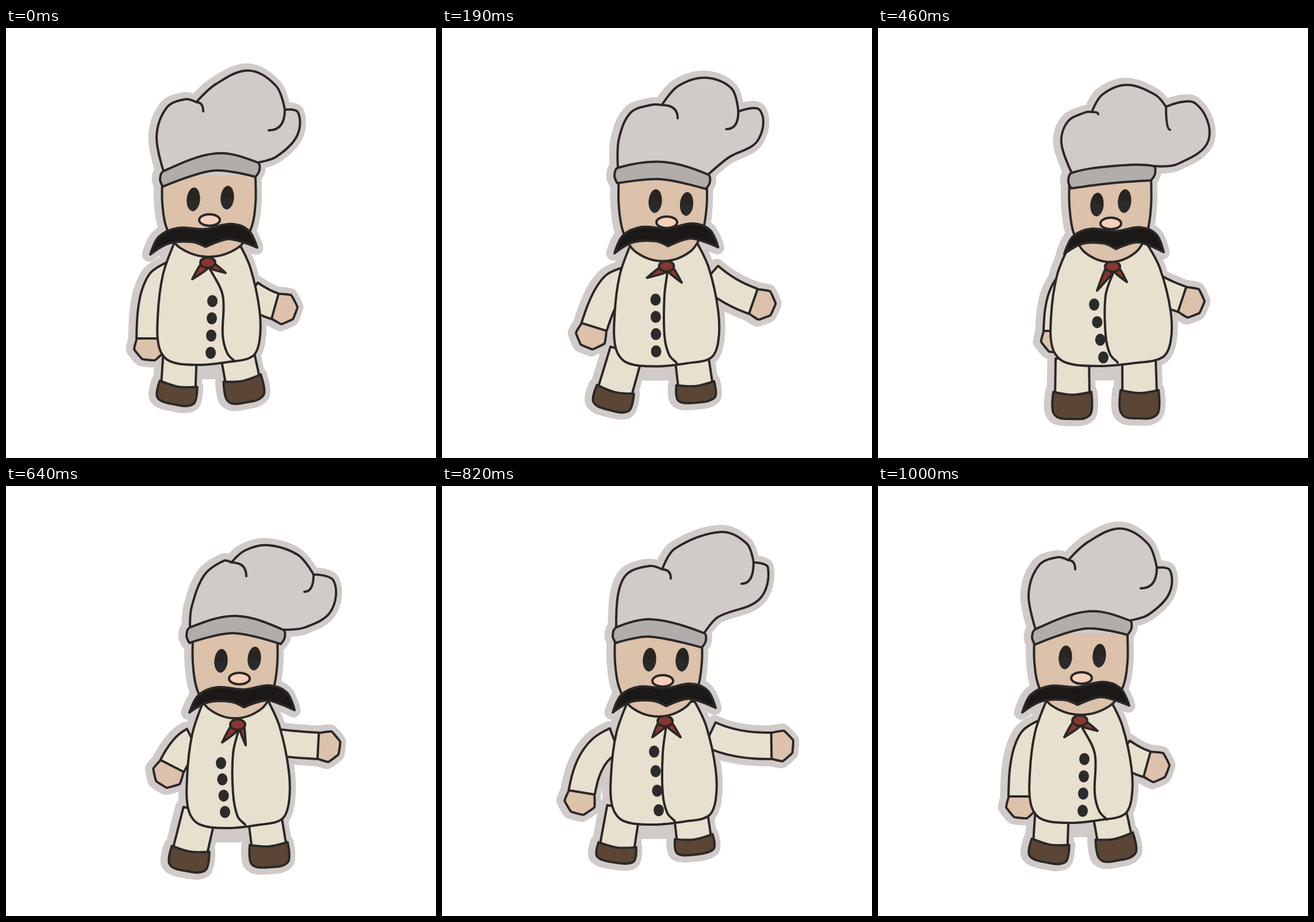
An HTML page with a canvas that plays this animation: 748 px wide and 748 px high, repeating every 1130 ms.

```html
<!DOCTYPE html>
<html lang="en">
<head>
<meta charset="utf-8">
<title>Dancing chef</title>
<style>
html, body { margin: 0; width: 100%; height: 100%; overflow: hidden; background: #fff; }
canvas { display: block; }
</style>
</head>
<body>
<canvas id="stage" width="748" height="748"></canvas>
<script>
const ctx = document.getElementById('stage').getContext('2d');
const INK = '#2a2827', CREAM = '#e7e0cf', SKIN = '#dcc1ab', SHOE = '#5b4636', RED = '#8a3731', HAT = '#d0cbc8';

// Joints of a pose. Arms: shoulder, elbow, wrist. Legs: hip, ankle, toe.
// Face: left, right, chin. Body: left, right, hem, seam. Scarf: knot and two tips.
const rest = {
  band: [[274, 249], [366, 218], [438, 234]],
  puffL: [[262, 188], [280, 138], [312, 124]], notchL: [331, 129], foldL: [343, 145],
  puffM: [[366, 97], [422, 74], [470, 101]], notchR: [485, 142], foldR: [457, 178],
  puffR: [[508, 147], [506, 188], [470, 224]],
  face: [272, 434, 398], eyes: [[326, 298], [385, 295]], nose: [354, 334], tache: [[251, 394], [437, 382]],
  body: [264, 441, 586, 377], scarf: [[351, 408], [324, 437], [382, 426]], buttons: [[359, 475], [356, 565]],
  armL: [[285, 430], [250, 438], [250, 540]], armR: [[425, 462], [450, 479], [468, 484]],
  legL: [[303, 560], [300, 620], [294, 655]], legR: [[400, 555], [411, 610], [419, 651]]
};
const stepOut = {
  band: [[295, 246], [375, 233], [446, 248]],
  puffL: [[296, 180], [311, 139], [345, 129]], notchL: [362, 131], foldL: [376, 161],
  puffM: [[390, 93], [440, 76], [490, 95]], notchR: [503, 151], foldR: [477, 177],
  puffR: [[541, 153], [522, 197], [478, 214]],
  face: [299, 449, 402], eyes: [[352, 302], [408, 306]], nose: [375, 339], tache: [[283, 393], [458, 375]],
  body: [286, 465, 591, 383], scarf: [[383, 409], [346, 425], [409, 441]], buttons: [[367, 467], [364, 559]],
  armL: [[300, 441], [276, 440], [261, 541]], armR: [[445, 425], [482, 475], [524, 495]],
  legL: [[317, 565], [302, 629], [296, 663]], legR: [[416, 565], [422, 611], [424, 639]]
};
const swing = {
  band: [[317, 240], [395, 233], [480, 262]],
  puffL: [[319, 208], [345, 156], [385, 138]], notchL: [403, 137], foldL: [444, 153],
  puffM: [[430, 110], [476, 97], [517, 115]], notchR: [528, 140], foldR: [512, 175],
  puffR: [[566, 134], [576, 195], [520, 236]],
  face: [316, 472, 409], eyes: [[390, 300], [443, 306]], nose: [407, 337], tache: [[317, 391], [503, 388]],
  body: [314, 496, 586, 391], scarf: [[398, 420], [367, 444], [425, 445]], buttons: [[376, 478], [381, 566]],
  armL: [[328, 440], [300, 448], [268, 499]], armR: [[485, 437], [515, 446], [559, 456]],
  legL: [[325, 560], [301, 630], [290, 667]], legR: [[451, 570], [459, 627], [464, 664]]
};
const plant = {
  band: [[337, 252], [410, 240], [479, 240]],
  puffL: [[319, 200], [330, 163], [360, 147]], notchL: [372, 146], foldL: [383, 150],
  puffM: [[390, 116], [433, 99], [482, 116]], notchR: [501, 137], foldR: [508, 177],
  puffR: [[552, 131], [575, 195], [520, 237]],
  face: [333, 475, 407], eyes: [[381, 307], [429, 301]], nose: [405, 340], tache: [[324, 393], [497, 390]],
  body: [301, 509, 588, 396], scarf: [[408, 415], [381, 457], [433, 442]], buttons: [[376, 481], [392, 573]],
  armL: [[340, 440], [312, 455], [311, 527]], armR: [[480, 450], [505, 464], [529, 472]],
  legL: [[338, 575], [338, 634], [338, 680]], legR: [[454, 575], [455, 631], [455, 679]]
};
const lift = {
  band: [[320, 246], [400, 226], [482, 250]],
  puffL: [[323, 210], [345, 155], [379, 130]], notchL: [392, 133], foldL: [418, 157],
  puffM: [[416, 112], [456, 103], [508, 120]], notchR: [535, 154], foldR: [519, 184],
  puffR: [[570, 165], [565, 218], [520, 246]],
  face: [325, 472, 404], eyes: [[374, 304], [432, 300]], nose: [406, 335], tache: [[319, 394], [502, 390]],
  body: [315, 492, 595, 395], scarf: [[403, 415], [376, 446], [417, 451]], buttons: [[374, 482], [381, 567]],
  armL: [[325, 443], [307, 452], [289, 487]], armR: [[472, 446], [505, 450], [543, 452]],
  legL: [[337, 565], [321, 632], [315, 670]], legR: [[450, 575], [457, 623], [460, 663]]
};
const reach = {
  band: [[303, 246], [365, 232], [456, 256]],
  puffL: [[307, 185], [323, 152], [362, 139]], notchL: [383, 145], foldL: [398, 161],
  puffM: [[405, 109], [485, 80], [530, 100]], notchR: [542, 133], foldR: [521, 170],
  puffR: [[567, 142], [552, 197], [480, 228]],
  face: [301, 452, 401], eyes: [[361, 302], [418, 302]], nose: [384, 339], tache: [[297, 394], [476, 386]],
  body: [294, 476, 589, 384], scarf: [[388, 409], [366, 437], [415, 437]], buttons: [[369, 462], [377, 564]],
  armL: [[300, 443], [255, 460], [243, 533]], armR: [[466, 432], [510, 453], [573, 452]],
  legL: [[316, 560], [305, 625], [301, 655]], legR: [[432, 565], [438, 611], [442, 641]]
};

const mix = (a, b) => Array.isArray(a) ? a.map((v, i) => mix(v, b[i])) : (a + b) / 2;
const between = (a, b) => Object.fromEntries(Object.keys(a).map(key => [key, mix(a[key], b[key])]));
const shift = ([x, y], dx, dy) => [x + dx, y + dy];

// Unit direction from a to b
function aim(a, b) {
  const dx = b[0] - a[0], dy = b[1] - a[1], len = Math.hypot(dx, dy) || 1;
  return [dx / len, dy / len, len];
}

// Places points given as (forward, sideways) from an origin
const place = ([x, y], [dx, dy], pts) => pts.map(([u, v]) => [x + u * dx - v * dy, y + u * dy + v * dx]);

// Stretches points of a unit square over a box
const fit = (pts, x0, y0, x1, y1) => pts.map(([x, y]) => [x0 + x * (x1 - x0), y0 + y * (y1 - y0)]);

// Smooth curve through the points, with straight joins at the corners
function curve(pts, { open = false, round = 1, corners = [] } = {}) {
  const n = pts.length, path = new Path2D();
  const at = i => open ? pts[Math.max(0, Math.min(n - 1, i))] : pts[(i + n) % n];
  const slope = i => corners.includes(i % n) ? [0, 0] : aim(at(i - 1), at(i + 1));
  path.moveTo(...pts[0]);
  for (let i = 0; i < (open ? n - 1 : n); i++) {
    const p = at(i), q = at(i + 1), s = slope(i), e = slope(i + 1);
    const k = aim(p, q)[2] / 3 * round;
    path.bezierCurveTo(p[0] + s[0] * k, p[1] + s[1] * k, q[0] - e[0] * k, q[1] - e[1] * k, ...q);
  }
  if (!open) path.closePath();
  return path;
}

function bend(from, control, to) {
  const path = new Path2D();
  path.moveTo(...from);
  path.quadraticCurveTo(...control, ...to);
  return path;
}

function oval([x, y], rx, ry, tilt = 0, end = Math.PI * 2) {
  const path = new Path2D();
  path.ellipse(x, y, rx, ry, tilt, 0, end);
  return path;
}

function sleeve([a, b, c]) {
  const sides = [[], []];
  for (let t = 0; t <= 1; t += .25) {
    const p = mix(a, a).map((_, i) => (1 - t) ** 2 * a[i] + 2 * t * (1 - t) * b[i] + t * t * c[i]);
    const dir = aim([0, 0], [0, 1].map(i => (1 - t) * (b[i] - a[i]) + t * (c[i] - b[i])));
    place(p, dir, [[0, -23], [0, 23]]).forEach((edge, i) => sides[i].push(edge));
  }
  return curve([...sides[0], ...sides[1].reverse()], { corners: [0, 4, 5, 9] });
}

const HAND = [[0, -22], [22, -26], [38, -9], [36, 13], [19, 27], [0, 22]];
const hand = ([, elbow, wrist]) => curve(place(wrist, aim(elbow, wrist), HAND), { round: .2 });

function leg([hip, ankle]) {
  const dir = aim(hip, ankle), end = dir[2] + 6;
  return curve(place(hip, dir, [[0, 29], [end, 30], [end, -30], [0, -29]]), { round: 0 });
}

function shoe([, ankle, toe]) {
  const dir = aim(ankle, toe), len = dir[2];
  const pts = [[-1, 33], [4, 0], [-1, -33], [len * .75, -33], [len - 1, -21], [len, 0], [len - 2, 24], [len * .7, 34]];
  return curve(place(ankle, dir, pts), { corners: [0, 2] });
}

const JAW = [[0, 0], [0, .35], [.05, .66], [.19, .89]];
const HEAD = [...JAW, [.5, 1], ...JAW.map(([x, y]) => [1 - x, y]).reverse()];
const COAT = [[.16, 0], [.05, .26], [0, .6], [.015, .86], [.12, .97], [.4, 1],
  [.7, .975], [.93, .93], [1, .8], [1, .55], [.91, .2], [.8, 0]];
const TACHE = [[0, 0], [.09, -30], [.27, -43], [.52, -38], [.77, -44], [.93, -31],
  [1, 0], [.87, -11], [.73, -18], [.52, -7], [.4, -17], [.18, -17]];

// All shapes of a pose from back to front: path, fill, outlined
function shapes(p) {
  const [bandL, bandM, bandR] = p.band;
  const [left, right, hem, seam] = p.body;
  const [knot, tipL, tipR] = p.scarf;
  const [tacheL, tacheR] = p.tache;
  const tacheAim = aim(tacheL, tacheR);
  const list = [];
  const add = (path, fill, ink = true) => list.push({ path, fill, ink });

  for (const arm of [p.armL, p.armR]) {
    add(hand(arm), SKIN);
    add(sleeve(arm), CREAM);
  }
  for (const limb of [p.legL, p.legR]) {
    add(leg(limb), CREAM);
    add(shoe(limb), SHOE);
  }
  add(curve(fit(COAT, left, 375, right, hem), { corners: [0, 11] }), CREAM);
  add(curve([shift(knot, 2, 8), [seam, 465], [seam, 535], [seam + 8, hem - 20], [seam + 21, hem - 6]], { open: true }));
  add(curve([shift(knot, -11, 2), tipL, shift(knot, 0, 10)], { round: .4 , corners: [1] }), RED);
  add(curve([shift(knot, 11, 2), tipR, shift(knot, 4, 10)], { round: .4, corners: [1] }), RED);
  add(oval(knot, 13, 9), RED);

  add(curve(fit(HEAD, p.face[0], 256, p.face[1], p.face[2]), { open: true }), SKIN);
  add(curve([bandL, ...p.puffL, p.notchL, ...p.puffM, p.notchR, ...p.puffR, bandR], { corners: [0, 4, 8, 12] }), HAT);
  add(bend(p.notchL, [p.foldL[0], p.notchL[1]], p.foldL));
  add(bend(p.notchR, [p.notchR[0], p.foldR[1]], p.foldR));
  add(curve([bandL, bandM, bandR, shift(bandR, 3, 13), shift(bandR, -4, 25),
    shift(bandM, -5, 30), shift(bandL, -1, 27), shift(bandL, -6, 14)], { corners: [4, 6] }), '#b1adaa');

  add(oval(p.nose, 18, 10), '#f6d0ba');
  add(curve(place(tacheL, tacheAim, TACHE.map(([u, v]) => [u * tacheAim[2], v])), { corners: [0, 6, 9] }), '#1a1917');
  for (const eye of p.eyes) {
    add(oval(eye, 11.5, 20.5, .08), '#29241f', false);
    add(oval(eye, 11.5, 20.5, .08, Math.PI), '#2b2a2a', false);
  }
  const [first, last] = p.buttons;
  for (let i = 0; i < 4; i++) {
    const dx = (last[0] - first[0]) * i / 3, dy = (last[1] - first[1]) * i / 3;
    add(oval(shift(first, dx, dy), 9, 10.5), '#2b2b2c', false);
  }
  return list;
}

// Soft rim around the whole figure, closed between the legs
function drawRim(list, { legL, legR, body }) {
  ctx.save();
  ctx.translate(-2, 0);
  ctx.strokeStyle = ctx.fillStyle = HAT;
  ctx.lineWidth = 25;
  for (const { path, fill } of list) if (fill) ctx.stroke(path);
  const low = body[2] + 25;
  ctx.fill(curve([legL[0], legR[0], [legR[1][0], low], [legL[1][0], low]], { round: 0 }));
  ctx.restore();
}

function draw(pose) {
  const list = shapes(pose);
  ctx.fillStyle = '#fff';
  ctx.fillRect(0, 0, 748, 748);
  ctx.lineJoin = ctx.lineCap = 'round';
  drawRim(list, pose);
  ctx.strokeStyle = INK;
  ctx.lineWidth = 4;
  for (const { path, fill, ink } of list) {
    ctx.fillStyle = fill;
    if (fill) ctx.fill(path);
    if (ink) ctx.stroke(path);
  }
}

const dance = [
  rest, stepOut, between(stepOut, swing), swing, between(swing, plant), plant,
  lift, between(lift, reach), reach, between(reach, rest), rest
];

// Each half of the dance makes five changes, 90 ms apart
const changes = (t, start) => Math.max(0, Math.min(5, Math.floor((t - start) / 90) + 1));

let shown;
function tick() {
  const t = performance.now() % 1130;
  const pose = dance[changes(t, 100) + changes(t, 640)];
  if (pose !== shown) draw(pose);
  shown = pose;
  requestAnimationFrame(tick);
}
tick();
</script>
</body>
</html>
```
